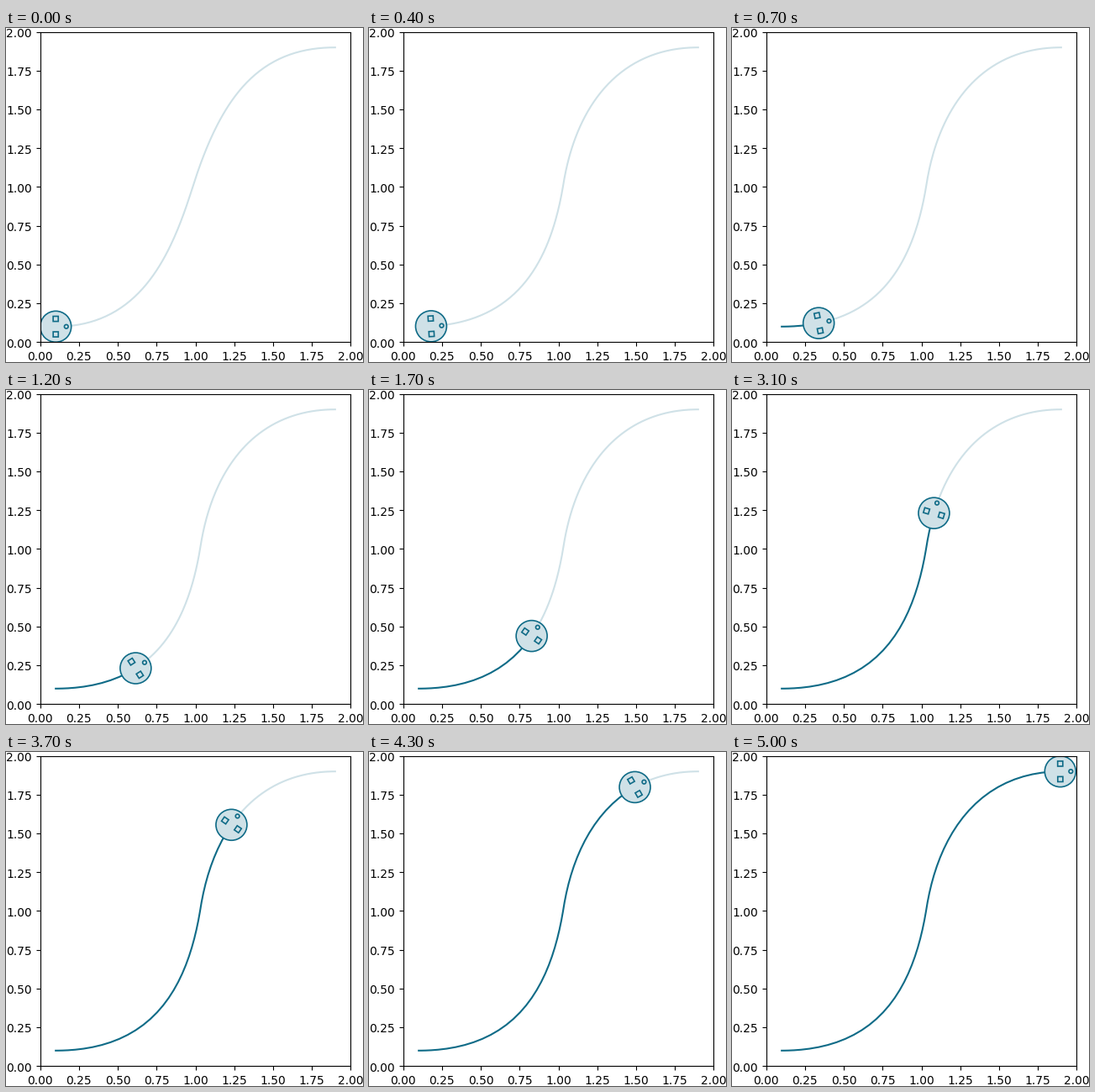
A matplotlib script for the animation above (5.1 s loop, 425 by 398 pixels).

```python
import matplotlib.pyplot as plt
import numpy as np
from matplotlib.animation import FuncAnimation
from matplotlib.patches import Circle, Polygon
from matplotlib.transforms import ScaledTranslation

W, H, DPI = 425, 398, 100
FRAMES, STEP_MS = 51, 100
INK, PALE = "#0f6b87", "#cfe1e7"
RADIUS = 0.1
START, GOAL = np.array([0.1, 0.1]), np.array([1.9, 1.9])
RAMP = 0.6  # seconds of constant acceleration before cruising
LAST = (FRAMES - 1) * STEP_MS / 1000


def bezier(p0, p1, p2, p3, n=300):
    u = np.linspace(0, 1, n)[:, None]
    v = 1 - u
    return v**3 * p0 + 3 * u * v**2 * p1 + 3 * u**2 * v * p2 + u**3 * p3


def s_curve(mid, deg, pulls):
    """Two Bezier arcs, level at both ends, meeting at mid with a given slope."""
    mid = np.array(mid)
    level = np.array([1, 0])
    slope = np.array([np.cos(np.radians(deg)), np.sin(np.radians(deg))])
    a, b, c, d = pulls
    low = bezier(START, START + a * level, mid - b * slope, mid)
    high = bezier(mid, mid + c * slope, GOAL - d * level, GOAL)
    pts = np.vstack([low, high[1:]])
    length = np.r_[0, np.cumsum(np.hypot(*np.diff(pts, axis=0).T))]
    return length / length[-1], pts


DRIVEN = s_curve((1.033, 1.02), 81, (0.6, 0.56, 0.52, 0.5))
FIRST_PLAN = s_curve((0.982, 0.999), 72.5, (0.55, 0.45, 0.6, 0.5))


def along(curve, f):
    """Points at the length fractions f of a curve."""
    frac, pts = curve
    return np.column_stack([np.interp(f, frac, pts[:, i]) for i in (0, 1)])


def progress(t):
    """Fraction of the way driven: speed up, then cruise."""
    def dist(t):
        return np.where(t < RAMP, t**2 / (2 * RAMP), t - RAMP / 2)
    return 0.998 * dist(t) / dist(LAST)


fig = plt.figure(figsize=(W / DPI, H / DPI), dpi=DPI, facecolor="white")
side = 369.6
ax = fig.add_axes([40.72 / W, 23.72 / H, side / W, side / H])
ax.set(xlim=(0, 2), ylim=(0, 2))
ticks = np.arange(0, 2.01, 0.25)
labels = [f"{v:.2f}" for v in ticks]
ax.set_xticks(ticks, labels)
ax.set_yticks(ticks, labels)

# Labels sit slightly below their usual place.
drop = ScaledTranslation(0, -0.82 / DPI, fig.dpi_scale_trans)
for label in ax.get_xticklabels() + ax.get_yticklabels():
    label.set_transform(label.get_transform() + drop)

plan_line, = ax.plot([], [], color=PALE, lw=1.5)
trail_line, = ax.plot([], [], color=INK, lw=1.5)

style = dict(facecolor=PALE, edgecolor=INK, lw=1.2)
body = ax.add_patch(Circle((0, 0), RADIUS, zorder=2.2, **style))
nose = ax.add_patch(Circle((0, 0), 0.0125, zorder=2.3, **style))
corners = 0.0165 * np.array([(-1, -1), (1, -1), (1, 1), (-1, 1)])
wheel_shapes = [corners + (0, y) for y in (-0.05, 0.05)]
wheels = [ax.add_patch(Polygon(s, zorder=2.3, **style)) for s in wheel_shapes]


def draw(k):
    now = progress(k * STEP_MS / 1000)
    ahead = np.linspace(now, 1, 150)
    mix = 0.4 ** k  # the first guess fades as the plan is refined
    plan = (1 - mix) * along(DRIVEN, ahead) + mix * along(FIRST_PLAN, ahead)
    plan_line.set_data(*plan.T)

    trail = along(DRIVEN, progress(np.arange(k + 1) * STEP_MS / 1000))
    trail_line.set_data(*trail.T)

    pos = trail[-1]
    back, front = along(DRIVEN, np.array([now - 0.002, now + 0.002]))
    dx, dy = (front - back) / np.hypot(*(front - back))
    turn = np.array([(dx, dy), (-dy, dx)])
    body.center = tuple(pos)
    nose.center = tuple(pos + np.array([0.068, 0]) @ turn)
    for wheel, shape in zip(wheels, wheel_shapes):
        wheel.set_xy(pos + shape @ turn)
    return [plan_line, trail_line, body, nose, *wheels]


anim = FuncAnimation(fig, draw, frames=FRAMES, interval=STEP_MS,
                     repeat=True, repeat_delay=0)
plt.show()
```
